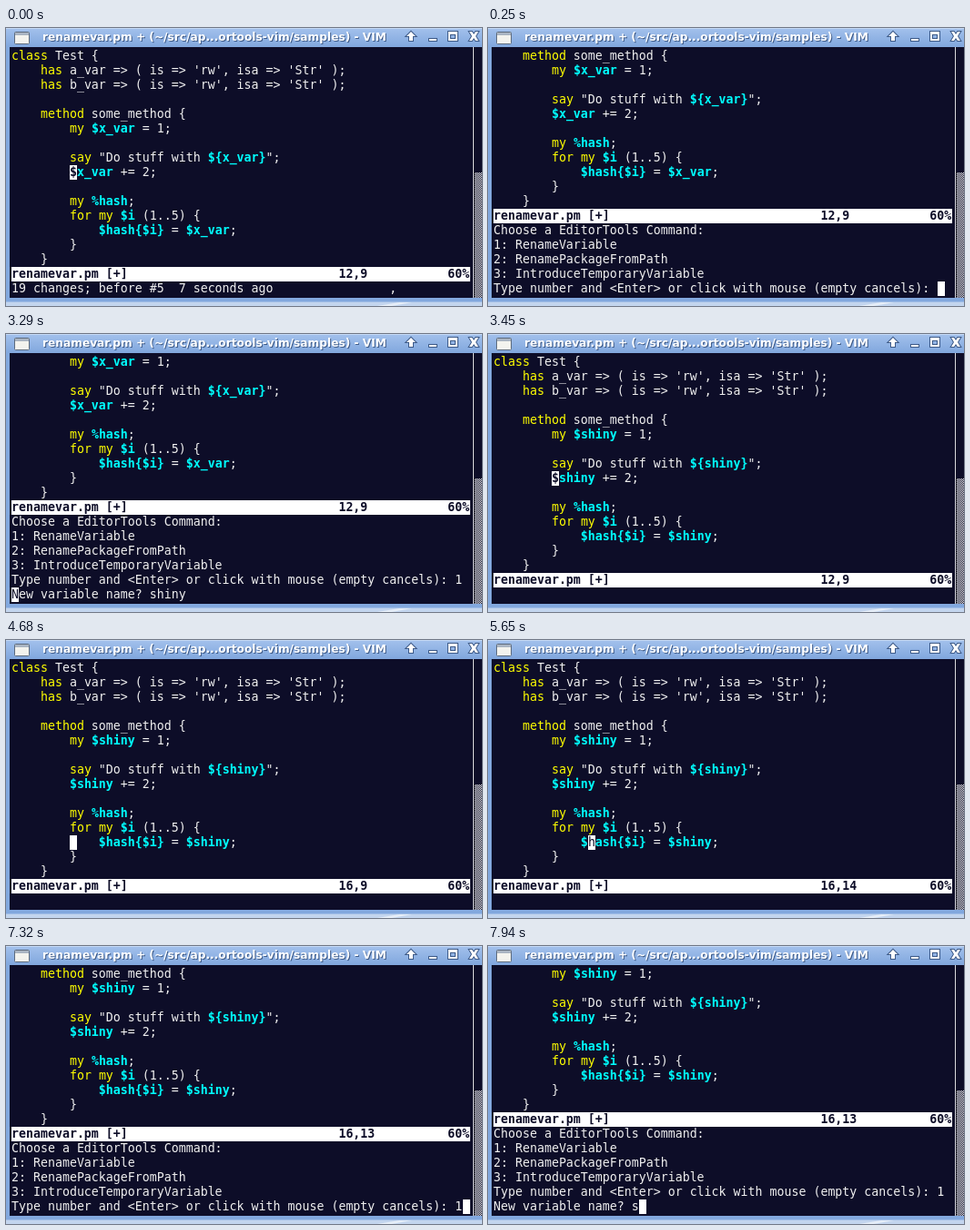
Write an HTML page that moves like this. It is 523 by 306 pixels and loops after 8000 ms.

```html
<!DOCTYPE html>
<html lang="en">
<head>
<meta charset="utf-8">
<title>Terminal</title>
<style>
  :root { --bg: #0d0d28; --fg: #f0f0f0; }
  html, body { margin: 0; width: 100%; height: 100%; overflow: hidden; }
  #win { position: relative; width: 523px; height: 306px; overflow: hidden;
    background: linear-gradient(#a3c1ec, #82a8de 20px, #82a8de 301px, #c3d5ee 302px); }
  #win > * { position: absolute; }
  #title { left: 40px; top: 1px; font: bold 12.2px/18px "DejaVu Sans", sans-serif;
    color: #fff; text-shadow: 1px 1px #3d5a88; white-space: pre; }
  #chrome { left: 0; top: 0; }
  #pane { left: 4px; top: 21px; width: 509px; height: 276px; background: var(--bg); }
  #bar { left: 513px; top: 21px; width: 9px; height: 276px;
    background: var(--bg); border-left: 1px solid #d8d8dc; }
  #thumb { left: 515px; top: 159px; width: 8px; height: 138px;
    background: repeating-conic-gradient(#f4f4f4 0 25%, var(--bg) 0 50%) 0 0 / 2px 2px; }
  #rows { left: 6px; top: 23px; width: 504px; }
  #rows div, #cursor { height: 16px; font: 13.288px/15px "DejaVu Sans Mono", monospace;
    color: var(--fg); white-space: pre; }
  #rows .status { background: #fff; color: var(--bg); font-weight: bold; }
  #rows .key { color: #ff0; }
  #rows .var { color: #0ff; font-weight: bold; }
  #cursor { width: 8px; background: #fff; color: var(--bg); }
</style>
</head>
<body>
<div id="win">
  <svg id="chrome" width="523" height="306">
    <path d="M0 .5H523" stroke="#c4d8f4"/>
    <path d="M408 306L432 302H446L424 306Z" fill="#e6eef8"/>
    <rect x="9.5" y="4.5" width="16" height="13" rx="1" fill="#f3f3ee" stroke="#5d6b7d"/>
    <path d="M10 6.5H25" stroke="#a9b4c2" stroke-width="3"/>
    <g fill="#fff" stroke="#3d5a88" paint-order="stroke" stroke-width="2">
      <path d="M445 4L450 9H447V14H443V9H440Z"/>
      <path d="M465 12H473V14H465Z"/>
      <path fill-rule="evenodd" d="M486 4H496V14H486ZM488 7V12H494V7Z"/>
      <path d="M510 4H512L514 7L516 4H519L516 9L519 14H516L514 11L512 14H509L512 9L509 4Z"/>
    </g>
  </svg>
  <div id="title">renamevar.pm + (~/src/ap...ortools-vim/samples) - VIM</div>
  <div id="pane"></div>
  <div id="bar"></div>
  <div id="thumb"></div>
  <div id="rows"></div>
  <div id="cursor"></div>
</div>
<script>
const LOOP = 8000, ROWS = 17, CELL_W = 8, CELL_H = 16, LEFT = 6, TOP = 23;
const rowsEl = document.getElementById('rows');
const cursorEl = document.getElementById('cursor');

const code = name => `class Test {
    has a_var => ( is => 'rw', isa => 'Str' );
    has b_var => ( is => 'rw', isa => 'Str' );

    method some_method {
        my $${name} = 1;

        say "Do stuff with \${${name}}";
        $${name} += 2;

        my %hash;
        for my $i (1..5) {
            $hash{$i} = $${name};
        }
    }`.split('\n');

const MENU = [
  'Choose a EditorTools Command:',
  '1: RenameVariable',
  '2: RenamePackageFromPath',
  '3: IntroduceTemporaryVariable'
];
const CHOICE = 'Type number and <Enter> or click with mouse (empty cancels): ';
const PROMPT = 'New variable name? ';

const syntax = /\b(class|has|method|my|say|for)\b|([$%](?:\{\w+\}|\w+(?:\{\$\w+\})?))/g;
const escape = s => s.replace(/&/g, '&amp;').replace(/</g, '&lt;');
const plain = text => ({ text, html: escape(text), cls: '' });
const source = text => ({
  ...plain(text),
  html: escape(text).replace(syntax, (m, key) => `<span class="${key ? 'key' : 'var'}">${m}</span>`)
});
const status = pos => ({
  ...plain('renamevar.pm [+]'.padEnd(45) + pos.padEnd(15) + '60%'), cls: 'status'
});
const buffer = (name, pos) => [...code(name).map(source), status(pos)];

// Normal mode: col 0 stands for an empty line.
function edit(name, line, col, msg = '', keys = '') {
  const rows = buffer(name, `${line},${col || '0-1'}`);
  rows.push(plain(msg.padEnd(52) + keys));
  return { rows, x: Math.max(col - 1, 0), y: line - 4 };
}

// Command menu; the screen scrolls up as lines are added below.
function menu(name, pos, answer, typed, home = false) {
  const lines = [...MENU, CHOICE + answer];
  if (typed !== undefined) lines.push(PROMPT + typed);
  const rows = [...buffer(name, pos), ...lines.map(plain)].slice(-ROWS);
  return { rows, x: home ? 0 : lines.at(-1).length, y: ROWS - 1 };
}

const UNDO = '19 changes; before #5  7 seconds ago';
const first = (...a) => menu('x_var', '12,9', ...a);
const second = (...a) => menu('shiny', '16,13', ...a);
const move = (...a) => edit('shiny', ...a);

const steps = [
  [0, edit('x_var', 12, 9, UNDO, ',')],
  [100, edit('x_var', 12, 9, UNDO, ',p')],
  [250, first('')],
  [1750, first('1')],
  [1960, first('1', '')],
  [2130, first('1', 's')],
  [2280, first('1', 'sh')],
  [2590, first('1', 'shi')],
  [2790, first('1', 'shin')],
  [2990, first('1', 'shiny')],
  [3290, first('1', 'shiny', true)],
  [3450, move(12, 9)],
  [3900, move(13, 0)],
  [4060, move(14, 9)],
  [4220, move(15, 9)],
  [4680, move(16, 9)],
  [4890, move(16, 10)],
  [5060, move(16, 11)],
  [5420, move(16, 12)],
  [5530, move(16, 13)],
  [5650, move(16, 14)],
  [6180, move(16, 13)],
  [6540, move(16, 13, '', ',')],
  [6810, move(16, 13, '', ',p')],
  [6960, second('')],
  [7320, second('1')],
  [7540, second('1', '')],
  [7940, second('1', 's')]
];

function show({ rows, x, y }) {
  rowsEl.innerHTML = rows.map(r => `<div class="${r.cls}">${r.html}</div>`).join('');
  const under = rows[y].text[x] || ' ';
  cursorEl.textContent = under;
  cursorEl.style.left = LEFT + x * CELL_W + 'px';
  cursorEl.style.top = TOP + y * CELL_H + 'px';
  cursorEl.style.fontWeight = under === '$' ? 'bold' : 'normal';
}

let start, shown;
function tick(now) {
  start ??= now;
  const t = Math.max(0, now - start) % LOOP;
  const step = steps.findLast(([at]) => at <= t);
  if (step !== shown) show((shown = step)[1]);
  requestAnimationFrame(tick);
}
show((shown = steps[0])[1]);
requestAnimationFrame(tick);
</script>
</body>
</html>
```
